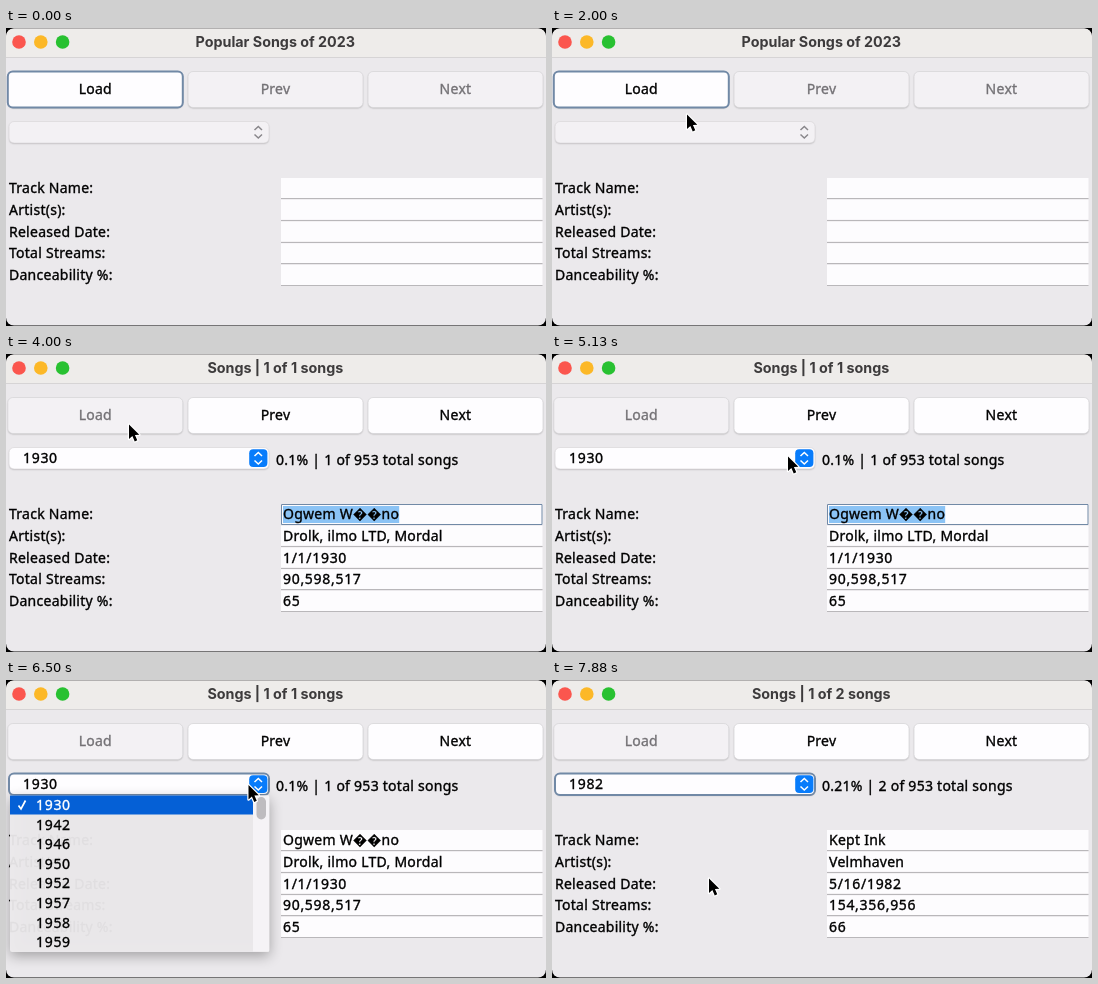
Recreate the animation shown at these times as an HTML page with a canvas. Size 540 by 298 pixels, loop 8000 ms.

```html
<!DOCTYPE html>
<html lang="en">
<head>
<meta charset="utf-8">
<title>Popular Songs</title>
<style>
html, body { margin: 0; width: 100%; height: 100%; overflow: hidden; background: #000; }
canvas { display: block; }
</style>
</head>
<body>
<canvas id="stage" width="540" height="298"></canvas>
<script>
const ctx = document.getElementById('stage').getContext('2d');
const LOOP = 8000, TICK = 125;
const PRESS = 3000, LOAD = 3375, OPEN = 6250, SCROLL = 6875, HOVER = 7500, PICK = 7875;
const ROW = 19.57, LIST_TOP = 115.5, ROWS = 8, TARGET_ROW = 15;
const INK = '#000', FOCUS = '#7189a6';
const YEARS = [1930, 1942, 1946, 1950, 1952, 1957, 1958, 1959, 1963, 1968, 1970, 1971,
  1973, 1975, 1979, 1982, 1983, 1984, 1985];
const YEAR_COUNT = 50;
const LABELS = ['Track Name:', 'Artist(s):', 'Released Date:', 'Total Streams:', 'Danceability %:'];

const EMPTY = { title: 'Popular Songs of 2023', year: '', info: '', values: [] };
const FIRST = {
  title: 'Songs | 1 of 1 songs', year: '1930', info: '0.1% | 1 of 953 total songs',
  values: ['Ogwem W\ufffd\ufffdno', 'Drolk, ilmo LTD, Mordal', '1/1/1930', '90,598,517', '65']
};
const SECOND = {
  title: 'Songs | 1 of 2 songs', year: '1982', info: '0.21% | 2 of 953 total songs',
  values: ['Kept Ink', 'Velmhaven', '5/16/1982', '154,356,956', '66']
};

// Pointer path: time, x, y
const PATH = [
  [875, 232, 304], [1375, 180, 190], [1750, 140, 110], [2000, 135, 86.5], [2625, 123, 70.5],
  [4125, 123, 70.5], [4500, 160, 78], [5000, 228, 97], [5125, 236, 102.5], [6000, 242.5, 105],
  [6500, 242.5, 105], [6875, 157, 196], [7375, 157, 196], [7625, 157, 198.5]
];

function pointerAt(t) {
  const i = PATH.findIndex(p => p[0] > t);
  if (i === 0) return null;
  if (i < 0) return PATH.at(-1).slice(1);
  const a = PATH[i - 1], b = PATH[i], k = (t - a[0]) / (b[0] - a[0]);
  return [a[1] + (b[1] - a[1]) * k, a[2] + (b[2] - a[2]) * k];
}

function box(x, y, w, h, r, fill, stroke, line = 1) {
  ctx.beginPath();
  ctx.roundRect(x, y, w, h, r);
  if (fill) { ctx.fillStyle = fill; ctx.fill(); }
  if (stroke) { ctx.strokeStyle = stroke; ctx.lineWidth = line; ctx.stroke(); }
}

function poly(points, stroke, width) {
  ctx.beginPath();
  points.forEach(p => ctx.lineTo(...p));
  ctx.strokeStyle = stroke;
  ctx.lineWidth = width;
  ctx.stroke();
}

function setFont(str) {
  ctx.font = '14px "Noto Sans", "Open Sans", sans-serif';
  ctx.letterSpacing = /^[\d,\/]+$/.test(str) ? '0.7px' : '0.26px';
}

// A hairline stroke gives the slightly heavier weight of the interface font
function text(str, x, y, color = INK, align = 'left') {
  setFont(str);
  ctx.textAlign = align;
  ctx.fillStyle = ctx.strokeStyle = color;
  ctx.lineWidth = 0.35;
  ctx.fillText(str, x, y);
  ctx.strokeText(str, x, y);
}

function shadowed(blur, dy, color, draw) {
  ctx.save();
  ctx.shadowBlur = blur;
  ctx.shadowOffsetY = dy;
  ctx.shadowColor = color;
  draw();
  ctx.restore();
}

function titleBar(title) {
  ctx.fillStyle = '#eeecea';
  ctx.fillRect(0, 0, 540, 29);
  ctx.fillStyle = '#d6d4d5';
  ctx.fillRect(0, 29, 540, 1);
  ['#fb564e', '#fcb827', '#28c131'].forEach((c, i) => box(6.2 + 21.8 * i, 7.2, 13.6, 13.6, 6.8, c));
  ctx.font = '700 14.3px Inter, sans-serif';
  ctx.letterSpacing = '0px';
  ctx.textAlign = 'center';
  ctx.fillStyle = '#3d3b3c';
  ctx.fillText(title, 269.3, 18.5);
}

function button(label, x, enabled, focused, pressed) {
  const fill = pressed ? '#ecebed' : enabled ? '#fefdff' : '#f3f1f4';
  shadowed(1.5, 1, '#0003', () => box(x, 43.5, 175, 36, 5, fill));
  box(x, 43.5, 175, 36, 5, null, focused ? FOCUS : '#d9d7da', focused ? 2 : 0.8);
  text(label, x + 87.5, 66, enabled ? INK : '#737175', 'center');
}

function combo(year, focused) {
  shadowed(1.5, 1, '#0003', () => box(3, 93.5, 260, 21.5, 5, year ? '#fefdff' : '#f3f1f4'));
  box(3, 93.5, 260, 21.5, 5, null, focused ? FOCUS : '#dddbde', focused ? 2 : 0.8);
  if (year) box(243.2, 95.2, 18.2, 17.8, 4, '#087cfb');
  const color = year ? '#fff' : '#89878b';
  poly([[248.5, 102], [252.3, 98.5], [256, 102]], color, 1.5);
  poly([[248.5, 106.5], [252.3, 110], [256, 106.5]], color, 1.5);
  text(year, 17, 109.3);
}

function field(value, i, focused) {
  const y = 150 + 21.75 * i;
  ctx.fillStyle = '#fdfcfe';
  ctx.fillRect(275, y, 261.5, 20);
  if (focused) {
    setFont(value);
    ctx.fillStyle = '#8bc3f5';
    ctx.fillRect(277, y + 2, ctx.measureText(value).width, 17);
    box(275.5, Math.round(y) + 0.5, 260.5, 20, 0, null, FOCUS);
  } else {
    ctx.fillStyle = '#b9b7ba';
    ctx.fillRect(275, Math.round(y + 20), 261.5, 1);
  }
  text(value, 277, y + 15);
}

function popup(top, active) {
  shadowed(13, 4, '#0005', () => box(4, 115.5, 259.5, 156.5, 2, 'rgba(238,236,239,.94)'));
  ctx.fillStyle = '#f5f3f6';
  ctx.fillRect(247, LIST_TOP, 16, 156);
  const track = ROWS * ROW;
  box(250.5, 117 + top * track / YEAR_COUNT, 9.5, 22.5, 4.7, '#bebcbf');
  for (let n = 0; n < ROWS; n++) {
    const i = top + n, y = LIST_TOP + n * ROW, color = i === active ? '#fff' : INK;
    if (i === active) {
      ctx.fillStyle = '#0560d6';
      ctx.fillRect(4, y, 243, 19);
    }
    text(String(YEARS[i]), 30, y + 14.7, color);
    if (i === 0) poly([[12.5, y + 10], [15, y + 13.5], [19.5, y + 5]], color, 1.7);
  }
}

function pointer([x, y]) {
  ctx.save();
  ctx.translate(x, y);
  ctx.scale(0.94, 0.94);
  ctx.beginPath();
  [[0, 0], [0, 15.5], [3.6, 12.3], [6.1, 18], [8.8, 16.8], [6.3, 11.3], [11, 11]]
    .forEach(p => ctx.lineTo(...p));
  ctx.closePath();
  ctx.lineJoin = 'round';
  ctx.strokeStyle = '#fff';
  ctx.lineWidth = 2.6;
  ctx.stroke();
  ctx.fillStyle = '#000';
  ctx.fill();
  ctx.restore();
}

function draw(t) {
  const state = t < LOAD ? EMPTY : t < PICK ? FIRST : SECOND;
  const loaded = t >= LOAD, opened = t >= OPEN;
  const mouse = pointerAt(t);

  ctx.fillStyle = '#000';
  ctx.fillRect(0, 0, 540, 298);
  ctx.save();
  ctx.beginPath();
  ctx.roundRect(0, 0.5, 540, 297, 8);
  ctx.clip();
  ctx.fillStyle = '#ebe9ec';
  ctx.fillRect(0, 0, 540, 298);
  titleBar(state.title);
  button('Load', 1.8, !loaded, !loaded, t >= PRESS && !loaded);
  button('Prev', 182, loaded);
  button('Next', 362, loaded);
  combo(state.year, opened);
  text(state.info, 270, 111);
  LABELS.forEach((label, i) => {
    text(label, 3, 165 + 21.75 * i);
    field(state.values[i] || '', i, i === 0 && loaded && !opened);
  });
  if (opened && t < PICK) {
    const top = Math.round(11 * Math.min(1, Math.max(0, (t - SCROLL) / (HOVER - TICK - SCROLL))));
    const hovered = Math.max(0, Math.floor((mouse[1] - LIST_TOP) / ROW));
    popup(top, t >= HOVER ? TARGET_ROW : hovered);
  }
  if (mouse) pointer(mouse);
  ctx.restore();
}

function frame() {
  const t = performance.now() % LOOP;
  draw(Math.floor(t / TICK) * TICK);
  requestAnimationFrame(frame);
}
frame();
</script>
</body>
</html>
```
